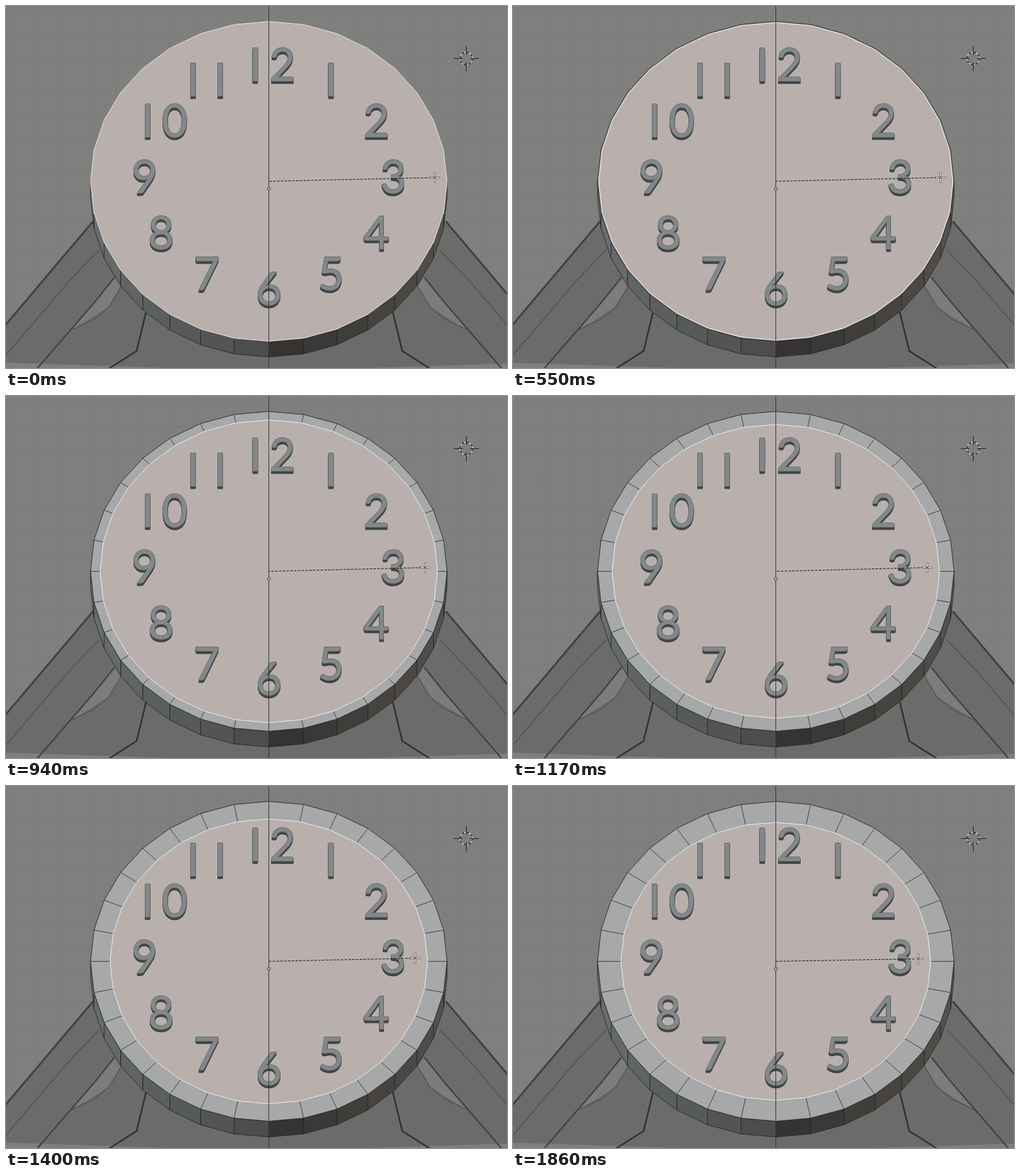
Write an HTML page with a canvas that moves like this. It is 794 by 575 pixels and loops after 2.79 s.

```html
<!DOCTYPE html>
<html>
<head>
<meta charset="utf-8">
<style>
html, body { margin: 0; width: 100%; height: 100%; overflow: hidden; background: #7f7f7d; }
canvas { display: block; }
</style>
</head>
<body>
<canvas id="stage" width="794" height="575"></canvas>
<script>
const ctx = document.getElementById('stage').getContext('2d');
const LOOP = 2790, STEP = 76.9, LAST_STEP = 19;
const CX = 416.5, CY = 278.5, RX = 282.5, RY = 254, DEPTH = 25, SIDES = 32;

// Steady inward drag that slows down at the end
function insetAt(t) {
  const step = Math.min(LAST_STEP, Math.floor((t - 395) / STEP));
  const steady = Math.max(0, 0.4 * (step + 1), 2.63 * (step - 1.24));
  return steady < 31 ? steady : 37 - 6 * ((LAST_STEP - step) / 6) ** 2;
}

function rim(k, scale = 1, drop = 0) {
  const a = k * 2 * Math.PI / SIDES;
  return [CX + RX * scale * Math.sin(a), CY - RY * scale * Math.cos(a) + drop];
}

const ring = scale => Array.from({ length: SIDES }, (_, k) => rim(k, scale));

function shape(points, fill, stroke, width = 1, close = true) {
  ctx.beginPath();
  points.forEach(p => ctx.lineTo(...p));
  if (close) ctx.closePath();
  if (fill) { ctx.fillStyle = fill; ctx.fill(); }
  if (stroke) { ctx.strokeStyle = stroke; ctx.lineWidth = width; ctx.stroke(); }
}

const line = (points, color, width) => shape(points, null, color, width, false);

function circle(x, y, r, color, width, fill) {
  ctx.beginPath();
  ctx.arc(x, y, r, 0, 2 * Math.PI);
  if (fill) { ctx.fillStyle = fill; ctx.fill(); }
  ctx.strokeStyle = color;
  ctx.lineWidth = width;
  ctx.stroke();
}

// Four arms around a point
function cross(x, y, from, to, color, width) {
  for (const s of [-1, 1]) {
    line([[x + from * s, y], [x + to * s, y]], color, width);
    line([[x, y + from * s], [x, y + to * s]], color, width);
  }
}

function drawBackground() {
  ctx.fillStyle = '#7f7f7d';
  ctx.fillRect(0, 0, 794, 575);
  for (let p = 7.5; p < 794; p += 42) {
    line([[p, 0], [p, 575]], 'rgba(90,90,90,.07)');
    line([[0, p], [794, p]], 'rgba(90,90,90,.07)');
  }
}

function drawLeg() {
  shape([[138, 342], [-50, 565], [CX + 2, 580], [CX + 2, 342]], '#6b6b6a');
  shape([[172, 430], [183, 445], [163, 478], [105, 514], [140, 471]], '#7c7c7b');
  line([[183, 445], [163, 478], [140, 497], [105, 514]], '#555554', 1.5);
  line([[138, 342], [-50, 565]], '#414140', 3);
  line([[147, 388], [100, 437], [-20, 578]], '#515150', 1.5);
  line([[172, 431], [140, 471], [50, 575]], '#434342', 2.5);
  line([[222, 486], [207, 548], [163, 576]], '#303030', 2.5);
}

function drawLegs() {
  drawLeg();
  ctx.save();
  ctx.translate(2 * CX + 2, 0);
  ctx.scale(-1, 1);
  drawLeg();
  ctx.restore();
}

function sideColor(k) {
  const right = k < SIDES / 2;
  const f = right ? (15 - k) / 7 : ((k - 16) / 7) ** 0.8;
  const from = right ? [53, 52, 50] : [76, 77, 76];
  const gain = right ? [39, 34, 33] : [31, 36, 38];
  return `rgb(${from.map((v, i) => v + gain[i] * f)})`;
}

function drawDisc(scale) {
  for (let k = 8; k < 24; k++) {
    shape([rim(k), rim(k + 1), rim(k + 1, 1, DEPTH), rim(k, 1, DEPTH)], sideColor(k), '#252525', 0.9);
  }
  const outer = ring(1), inner = ring(scale);
  shape(outer, '#a6a8aa', '#2c2c2c');
  if (scale < 1) outer.forEach((p, k) => line([p, inner[k]], '#303132', 0.9));
  shape(inner, '#b9b0ad', '#f2f0ef');
}

// The raised 1 is a plain bar, which the capital I provides
function drawDigit(digit, x, y) {
  const glyph = digit === '1' ? 'I' : digit;
  const put = (drop, color, width) => {
    ctx.fillStyle = ctx.strokeStyle = color;
    ctx.lineWidth = width;
    ctx.fillText(glyph, x, y + drop);
    ctx.strokeText(glyph, x, y + drop);
  };
  for (let drop = 4; drop > 0; drop--) put(drop, '#424445', 1.5);
  put(0, '#5b5f60', 1.8);
  put(0, '#83888a', 0.6);
}

function drawNumerals() {
  ctx.font = '71px Lato, sans-serif';
  ctx.textAlign = 'center';
  ctx.lineJoin = 'round';
  for (let hour = 1; hour <= 12; hour++) {
    const a = hour * Math.PI / 6, digits = [...String(hour)];
    digits.forEach((digit, i) => drawDigit(digit,
      CX + 197 * Math.sin(a) + 43 * (i - (digits.length - 1) / 2),
      297 - 178 * Math.cos(a)));
  }
  ctx.lineJoin = 'miter';
}

function drawSceneCursor(x, y) {
  const dash = 10 * Math.PI / 8;
  circle(x, y, 10, '#2a2a2a', 1.3);
  ctx.setLineDash([dash, dash]);
  ctx.lineDashOffset = dash;
  circle(x, y, 10, '#f0f0f0', 1.3);
  ctx.setLineDash([]);
  ctx.lineDashOffset = 0;
  cross(x, y, 6, 20, '#1c1c1c', 1);
}

function drawPointer(x, y) {
  ctx.setLineDash([4, 2]);
  line([[x, y], [CX, CY]], '#101010', 1);
  ctx.setLineDash([]);
  cross(x, y, 1, 8, '#444', 3);
  cross(x, y, 1.5, 7.5, '#fff', 1.5);
}

function draw(now) {
  const inset = insetAt(now % LOOP);
  drawBackground();
  drawLegs();
  drawDisc(1 - inset / RX);
  drawNumerals();
  line([[CX, 0], [CX, 575]], '#303030', 1);
  circle(CX, 290.5, 2.6, '#4a4646', 1, '#b7a5a1');
  drawSceneCursor(729.5, 83.5);
  drawPointer(Math.round(679 - inset) + 0.5, 272.5 + Math.max(0, Math.round((inset - 25) / 6)));
  requestAnimationFrame(() => draw(performance.now() - start));
}

const start = performance.now();
draw(0);
</script>
</body>
</html>
```
